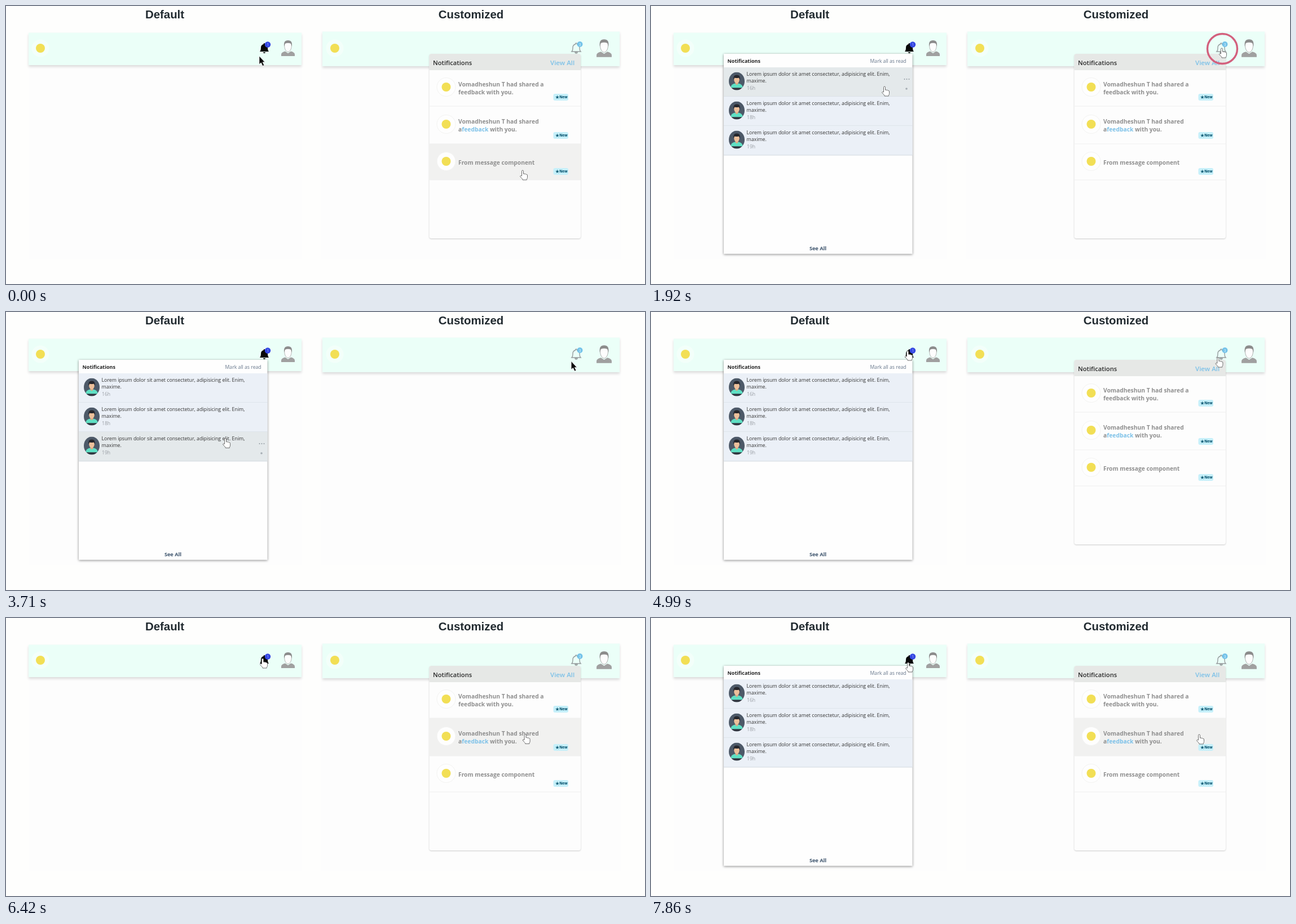
An HTML page that plays this animation: 1133x494 px, repeating every 7.99 s.

```html
<!DOCTYPE html>
<html lang="en">
<head>
<meta charset="utf-8">
<title>Notification panels</title>
<style>
html, body { margin: 0; width: 100%; height: 100%; overflow: hidden; background: #fefefd; }
svg { display: block; width: 1133px; height: 494px; font-family: "Open Sans", "Noto Sans", sans-serif; }
.title { font: bold 20.4px "Liberation Sans", Arial, sans-serif; fill: #212a30; text-anchor: middle; }
.small { font-size: 8.8px; fill: #333; }
.bold { font-weight: 700; }
.message { font-size: 10.3px; font-weight: 700; fill: #8f8f8f; }
.link { fill: #7cc1e8; }
.bar { fill: #ebfff8; filter: drop-shadow(0 3px 2px #0002); }
</style>
</head>
<body>
<svg viewBox="0 0 1133 494">
  <defs>
    <g id="person">
      <path d="M-12 14V11Q-12 7-5 5.5L0 9 5 5.5Q12 7 12 11V14Z" fill="#a0a0a0"/>
      <path d="M-6.3-5C-6.3 2-3 6.5 0 6.5S6.3 2 6.3-5Q6-11 0-11T-6.3-5Z" fill="#fdfdfd" stroke="#a5a5a5" stroke-width=".8"/>
      <path d="M-6.8-3Q-8.5-14 0-14 8.5-14 6.8-3L5.3-8Q0-10.5-5.3-8Z" fill="#8c8c8c"/>
    </g>
    <clipPath id="round"><ellipse rx="14" ry="16"/></clipPath>
    <g id="avatar" clip-path="url(#round)">
      <rect x="-14" y="-16" width="28" height="32" fill="#4d5968"/>
      <path d="M-11 12Q-10 5-3 4H3Q10 5 11 12Z" fill="#5fe0c4"/>
      <path d="M-2.5 1H2.5V5L0 7-2.5 5Z" fill="#dca984"/>
      <ellipse cy="-2.5" rx="4.8" ry="6.3" fill="#edc09b"/>
      <path d="M-5.5-2Q-7-11 0-11 7-11 5.5-2L4-6Q0-5-4-6Z" fill="#25262c"/>
      <rect x="-14" y="12" width="28" height="4" fill="#30363f"/>
    </g>
    <g id="logo">
      <circle r="16.5" fill="#fefefe" stroke="#f3f3f1"/>
      <circle r="8" fill="#f2df55"/>
    </g>
    <path id="bell" d="M0-9Q1.5-9 1.5-7Q6-6 6-1Q6 4 8 6H-8Q-6 4-6-1Q-6-6-1.5-7Q-1.5-9 0-9ZM-2 7H2Q2 9 0 9T-2 7Z"/>
    <path id="hand" d="M-1.5 10V1.5a1.5 1.5 0 0 1 3 0V6.3q1.6-.9 2.7.4 1.5-.7 2.5.6 1.8-.2 1.8 1.6V12.5q0 2-1.2 3.2V17H0V15.7Q-2 14-4.6 10.6q.6-2 3.1-.6z"
      fill="#fff" stroke="#6d6d6d" stroke-width="1" stroke-linejoin="round"/>
    <path id="arrow" d="M0 0V14.5L3.3 11.7 6 17.5 8.7 16.2 6 10.8H10Z" fill="#0b0b0b" stroke="#fff" stroke-width=".6"/>
  </defs>

  <path d="M40 47H525V450H40ZM559 45H1090V450H559Z" fill="#fdfdfd"/>
  <text class="title" x="281.5" y="21.5">Default</text>
  <text class="title" x="824.5" y="21.5">Customized</text>

  <rect class="bar" x="40" y="47.5" width="484" height="57.5"/>
  <rect class="bar" x="561" y="45.5" width="527" height="61.5"/>
  <g id="marks"></g>
  <use href="#person" x="500" y="75"/>
  <use href="#person" transform="translate(1060.5 75) scale(1.12)"/>

  <g id="leftPanel"></g>
  <g id="rightPanel"></g>

  <use href="#bell" x="458" y="75" fill="#080808"/>
  <circle cx="464" cy="68.5" r="5.2" fill="#3548e2"/>
  <text x="464" y="71" font-size="6.5" fill="#a9b4ff" text-anchor="middle">1</text>
  <use href="#bell" x="1011" y="75" fill="none" stroke="#969c9d" stroke-width="1.4"/>
  <circle cx="1017.5" cy="68" r="5" fill="#74c3e9"/>
  <text x="1017.5" y="70.5" font-size="6.5" fill="#e4f6ff" text-anchor="middle">3</text>

  <g id="pointers"></g>
</svg>
<script>
const $ = id => document.getElementById(id);
const LOOP = 7990;
const leftRows = [109, 161, 213, 265], rightRows = [114, 178, 245, 309];

$('marks').innerHTML = [[61, 75], [583, 75]].map(([x, y]) =>
  `<circle cx="${x}" cy="${y}" r="15.5" fill="#f3fffa"/><circle cx="${x}" cy="${y}" r="8" fill="#f2df55"/>`).join('');

$('leftPanel').innerHTML = `
  <rect x="129" y="85" width="334.5" height="355.5" fill="#fefefe" style="filter:drop-shadow(0 1px 2px #0007)"/>
  <text class="bold" x="135.5" y="101" font-size="9" fill="#222">Notifications</text>
  <text x="388.5" y="101" font-size="8.7" fill="#65758a">Mark all as read</text>
  ${['16h', '18h', '19h'].map((age, i) => {
    const y = leftRows[i];
    return `<rect class="row" x="129" y="${y}" width="334.5" height="52"/>
      <path d="M129 ${y + 52}H463.5" stroke="#d0d8df"/>
      <use href="#avatar" x="152" y="${y + 24.5}"/>
      <text class="small" x="169.5" y="${y + 15}">Lorem ipsum dolor sit amet consectetur, adipisicing elit. Enim,</text>
      <text class="small" x="169.5" y="${y + 27}">maxime.</text>
      <text x="170" y="${y + 40}" font-size="8.6" fill="#9a9fa5">${age}</text>
      <g class="more" fill="#8d959c"><circle cx="449.5" cy="${y + 21}" r=".9"/><circle cx="453.5" cy="${y + 21}" r=".9"/>
        <circle cx="457.5" cy="${y + 21}" r=".9"/><circle cx="453" cy="${y + 38}" r="1.8" fill="#a5adb3"/></g>`;
  }).join('')}
  <text class="bold" x="296" y="434" font-size="9.2" fill="#3c536c" text-anchor="middle">See All</text>`;

const sender = 'Vomadheshun T';
const messages = [
  [`${sender} had shared a`, 'feedback with you.', 143, 162],
  [`${sender} had shared`, 'a<tspan class="link">feedback</tspan> with you.', 209, 230],
  ['From message component', '', 282, 294]
];
$('rightPanel').innerHTML = `
  <rect x="750.5" y="85" width="268.5" height="328" rx="4" fill="#fdfdfd" style="filter:drop-shadow(0 1px 1px #0003)"/>
  <path d="M750.5 114V89Q750.5 85 754.5 85H1015Q1019 85 1019 89V114Z" fill="#e6e8e6"/>
  <text x="757" y="104.5" font-size="11.2" font-weight="600" fill="#2b2b2b">Notifications</text>
  <text class="link" x="965" y="104.5" font-size="11.5" font-weight="600">View All</text>
  ${messages.map(([first, second, base, badge], i) => `
    <rect class="row" x="750.5" y="${rightRows[i]}" width="268.5" height="${rightRows[i + 1] - rightRows[i]}"/>
    <path d="M750.5 ${rightRows[i + 1]}H1019" stroke="#efefef"/>
    <use href="#logo" x="780.5" y="${144 + 66 * i}"/>
    <text class="message" x="802" y="${base}">${first}</text>
    <text class="message" x="802" y="${base + 14}">${second}</text>
    <rect x="970.5" y="${badge - 6}" width="26.5" height="12" rx="3" fill="#c6f0fa"/>
    <g font-weight="800" fill="#17607a"><text x="973.5" y="${badge + 3}" font-family="DejaVu Sans, sans-serif" font-size="9">★</text>
      <text x="981.2" y="${badge + 2.4}" font-size="6.2">New</text></g>`).join('')}`;

// Pointer paths hold [ms, x, y] of the tip; spans hold [from, to) in ms.
const sides = [
  {
    panel: $('leftPanel'), rows: leftRows, x: [129, 463], radius: 24.5,
    plain: '#ebf0f7', hover: '#e4e9eb',
    path: [[0, 449, 89], [240, 449, 89], [530, 456, 79], [1120, 456, 79], [1920, 414, 143], [2230, 414, 143],
      [3150, 406, 200], [3710, 389, 224], [4050, 390, 232], [4380, 440, 130], [4700, 455, 69],
      [4990, 455, 69], [6420, 455, 72], [7000, 456, 79]],
    open: [[530, 5740], [7030, LOOP]], ring: [[530, 820], [5580, 5900], [6870, 7190]], arrow: [[0, 380]]
  },
  {
    panel: $('rightPanel'), rows: rightRows, x: [750, 1019], radius: 26.5,
    plain: 'none', hover: '#f1f1f0',
    path: [[0, 916, 292], [680, 961, 235], [1120, 985, 170], [1500, 1012, 75], [2230, 1012, 75], [2900, 1002, 88],
      [3710, 1002, 88], [4210, 1006, 79], [4990, 1006, 79], [5340, 995, 120], [6000, 940, 190],
      [6420, 920, 207], [7000, 912, 210], [7860, 972, 207]],
    open: [[0, 2230], [4500, LOOP]], ring: [[1760, 2230], [4370, 4660]], arrow: [[2680, 4150]]
  }
];
$('pointers').innerHTML = sides.map(s =>
  `<g><circle cx="1" cy="1" r="${s.radius}" fill="none" stroke="#d3607d" stroke-width="3.4"/><use/></g>`).join('');
sides.forEach((s, i) => {
  s.pointer = $('pointers').children[i];
  s.cells = [...s.panel.querySelectorAll('.row')];
  s.more = [...s.panel.querySelectorAll('.more')];
});

const bursts = [[100, 1120, 8], [1380, 1920, 5], [2230, 3150, 7], [3410, 4380, 7],
  [4510, 5340, 6], [5590, 6570, 7], [6720, 7710, 7], [7860, 7860, 1]];
const steps = [0, ...bursts.flatMap(([a, b, n]) =>
  Array.from({ length: n }, (_, i) => a + (b - a) * i / Math.max(1, n - 1)))];
const within = (spans, t) => spans.some(([a, b]) => t >= a && t < b);
const show = (el, on) => el.setAttribute('visibility', on ? 'inherit' : 'hidden');

function at(path, t) {
  const i = path.findIndex(k => k[0] > t);
  if (i < 0) return path.at(-1).slice(1);
  const [a, x, y] = path[i - 1], [b, u, v] = path[i];
  const f = (t - a) / (b - a);
  return [x + (u - x) * f, y + (v - y) * f];
}

function draw(now) {
  const time = now % LOOP;
  const t = steps.findLast(s => s <= time + (s ? 25 : 0));
  for (const s of sides) {
    const [x, y] = at(s.path, t);
    const [ring, cursor] = s.pointer.children;
    s.pointer.setAttribute('transform', `translate(${x} ${y})`);
    show(ring, within(s.ring, t));
    cursor.setAttribute('href', within(s.arrow, t) ? '#arrow' : '#hand');
    show(s.panel, within(s.open, t));
    s.cells.forEach((cell, i) => {
      const over = x > s.x[0] && x < s.x[1] && y >= s.rows[i] && y < s.rows[i + 1];
      cell.setAttribute('fill', over ? s.hover : s.plain);
      if (s.more[i]) show(s.more[i], over);
    });
  }
}
const start = performance.now();
function tick() {
  draw(performance.now() - start);
  requestAnimationFrame(tick);
}
tick();
</script>
</body>
</html>
```
